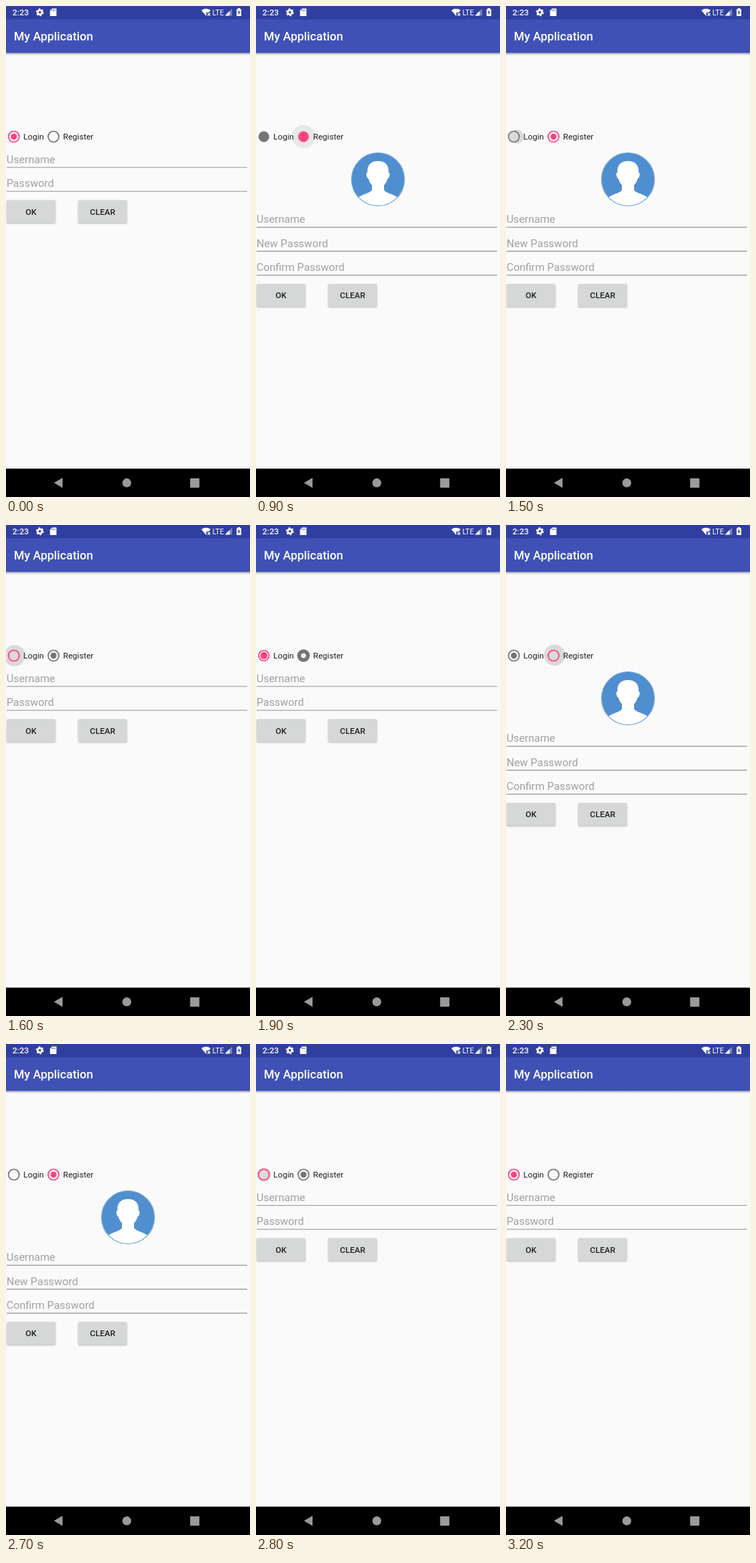
Animation, 341 px wide and 684 px high, one loop 3400 ms. Source, as an HTML page:

```html
<!DOCTYPE html>
<html lang="en">
<head>
<meta charset="utf-8">
<title>My Application</title>
<style>
  html, body { margin: 0; width: 100%; height: 100%; overflow: hidden; background: #fafafa; }
  svg { display: block; width: 341px; height: 684px; font-family: Roboto, sans-serif; }
  .bold { font-weight: 500; }
  .label { font-size: 11.6px; fill: #212121; }
  .hint { font-size: 15px; fill: #a0a0a0; }
  .btn { fill: #d6d7d7; filter: drop-shadow(0 1px .8px rgba(0, 0, 0, .28)); }
  .caption { font-size: 11.6px; font-weight: 500; fill: #202020; text-anchor: middle; }
</style>
</head>
<body>
<svg viewBox="0 0 341 684">
  <defs>
    <linearGradient id="shade" x2="0" y2="1">
      <stop stop-color="#000" stop-opacity=".3"/>
      <stop offset="1" stop-color="#000" stop-opacity="0"/>
    </linearGradient>
    <clipPath id="face"><circle cx="170.5" cy="241.5" r="37"/></clipPath>
    <g id="buttons">
      <rect class="btn" x="1" y="270.5" width="68" height="31.5" rx="1.5"/>
      <rect class="btn" x="101" y="270.5" width="68" height="31.5" rx="1.5"/>
      <text class="caption" x="35" y="290.6">OK</text>
      <text class="caption" x="135" y="290.6">CLEAR</text>
    </g>
  </defs>
  <rect width="341" height="684" fill="#fafafa"/>

  <!-- status and title bars -->
  <rect y="65.5" width="341" height="3.5" fill="url(#shade)"/>
  <rect y="18" width="341" height="47.5" fill="#3f51b5"/>
  <rect width="341" height="18.5" fill="#303f9f"/>
  <g fill="#fff">
    <text class="bold" x="9" y="13" font-size="11.6">2:23</text>
    <circle cx="47.3" cy="8.8" r="3" fill="none" stroke="#fff" stroke-width="2.6"/>
    <circle cx="47.3" cy="8.8" r="4.7" fill="none" stroke="#fff" stroke-width="1.6" stroke-dasharray="2.4 2.52"/>
    <path d="M64.5 3.5H70.5V14H61.5V6.5Z"/>
    <path d="M64.3 5v2.2M66.3 5v2.2M68.3 5v2.2" stroke="#303f9f" stroke-width=".8"/>
    <path d="M273 6Q279.5 1.5 286 6L283.5 9H280V13.2L279.5 13.8Z"/>
    <path d="M281.7 10l3.6 3.6m0-3.6l-3.6 3.6" stroke="#fff" stroke-width="1.2"/>
    <text x="288.5" y="12.5" font-size="10.2">LTE</text>
    <path d="M316 3.5V13.5H306Z" opacity=".35"/>
    <path d="M312.5 7V13.5H306Z"/>
    <path d="M324 3h3v1.2h1.7V14h-6.4V4.2H324Z"/>
    <path d="M326 5.5L323.7 9.6H325.2V12.6L327.4 8.5H326Z" fill="#303f9f"/>
    <text class="bold" x="11" y="48.3" font-size="16.6">My Application</text>
  </g>

  <!-- radio group -->
  <circle id="ripple"/>
  <g id="radios"></g>
  <text class="label" x="24.3" y="186.4">Login</text>
  <text class="label" x="79.8" y="186.4">Register</text>

  <g id="login">
    <g class="fields"></g>
    <use href="#buttons"/>
  </g>
  <g id="register">
    <circle cx="170.5" cy="241.5" r="37" fill="#508fcf"/>
    <path clip-path="url(#face)" fill="#fff" d="M170.5 216C180 216 186 221 185.3 232Q187.6 232.5 186.6 236Q185.8 240 184 240.5Q182.5 246 179 249.5V256C181 261 192 261.5 198.5 267L205 282H136L142.5 267C149 261.5 160 261 162 256V249.5Q158.5 246 157 240.5Q155.2 240 154.4 236Q153.4 232.5 155.7 232C155 221 161 216 170.5 216Z"/>
    <circle cx="170.5" cy="241.5" r="37" fill="none" stroke="#75a7da" stroke-width="1.2"/>
    <g class="fields"></g>
    <use href="#buttons" y="116.7"/>
  </g>

  <!-- navigation bar -->
  <rect y="644.5" width="341" height="39.5" fill="#000"/>
  <g fill="#9a9a9a">
    <path d="M67 664.3L79 657.3V671.3Z"/>
    <circle cx="168.8" cy="664.3" r="6.2"/>
    <rect x="257.3" y="658" width="13" height="13" rx=".8"/>
  </g>
</svg>
<script>
const LOOP = 3400, STEP = 100, FILL = 160, SETTLE = 400;
const PINK = '#ff4081', GREY = '#757575';
const CY = 182, CX = [11, 66.4];

// at: views swap; lead: progress already made by the radios at that moment
const switches = [
  { at: 900, lead: FILL, pick: 1 },
  { at: 1600, lead: 0, pick: 0 },
  { at: 2300, lead: 0, pick: 1 },
  { at: 2800, lead: 0, pick: 0 }
];
const taps = [
  { from: 700, show: 900, pick: 1, x: 66.4, y: 182 },
  { from: 1500, show: 1500, pick: 0, x: 15, y: 182 },
  { from: 2200, show: 2200, pick: 1, x: 72, y: 179 },
  { from: 2800, show: 2800, pick: 0, x: 11, y: 182 }
];

const $ = id => document.getElementById(id);
const mix = (a, b, k) => a + (b - a) * k;
const ease = k => k * k * (3 - 2 * k);

function add(parent, tag, attrs, text) {
  const el = document.createElementNS('http://www.w3.org/2000/svg', tag);
  set(el, attrs);
  if (text) el.textContent = text;
  return parent.appendChild(el);
}
function set(el, attrs) {
  for (const name in attrs) el.setAttribute(name, attrs[name]);
}

function addFields(view, top, hints, line) {
  const box = view.querySelector('.fields');
  hints.forEach((hint, i) => {
    const y = top + i * 33.4;
    add(box, 'text', { class: 'hint', x: 0.7, y }, hint);
    add(box, 'rect', { x: 1, y: y + 6 - line.h / 2, width: 336, height: line.h, fill: line.fill });
  });
}
addFields($('login'), 218.8, ['Username', 'Password'], { h: 1.6, fill: '#bababa' });
addFields($('register'), 302.2, ['Username', 'New Password', 'Confirm Password'], { h: 1, fill: '#808080' });

const radios = CX.map(cx => ({
  ring: add($('radios'), 'circle', { cx, cy: CY, fill: 'none' }),
  dot: add($('radios'), 'circle', { cx, cy: CY })
}));

function drawRadio({ ring, dot }, on, p) {
  const late = p >= FILL;
  const k = ease(late ? Math.min(1, (p - FILL) / (SETTLE - FILL)) : p / FILL);
  let scale, width = 1.7, r = 0;
  if (on === late) {
    // ring around a dot
    const swell = late ? 1 - k : k;
    scale = mix(1, 0.9, swell);
    r = mix(4.2, 6.2, swell);
  } else {
    // hollow ring that closes to a disc
    const close = late ? 1 - k : k;
    scale = mix(1, 0.5, close);
    width = mix(1.7, 15, close);
  }
  const color = on ? PINK : GREY;
  set(ring, { r: 7.5 * scale, 'stroke-width': width * scale, stroke: color });
  set(dot, { r, fill: color });
}

function drawRipple(t) {
  const tap = taps.findLast(a => t >= a.show);
  const p = tap ? t - tap.from : SETTLE;
  const k = Math.min(1, p / 200), out = 1 - (1 - k) ** 2;
  const alpha = p <= 100 ? 0.125 : Math.max(0, 0.07 * (SETTLE - p) / 200);
  set($('ripple'), {
    cx: tap ? mix(tap.x, CX[tap.pick], out) : 0,
    cy: tap ? mix(tap.y, CY, out) : 0,
    r: mix(10, 16.3, out),
    opacity: alpha
  });
}

function draw(now) {
  const t = Math.floor(now % LOOP / STEP) * STEP;
  const last = switches.findLast(s => t >= s.at);
  const pick = last ? last.pick : 0;
  const p = last ? t - last.at + last.lead : SETTLE;
  radios.forEach((radio, i) => drawRadio(radio, i === pick, p));
  drawRipple(t);
  $('login').style.display = pick ? 'none' : '';
  $('register').style.display = pick ? '' : 'none';
}

const start = performance.now();
function tick() {
  draw(performance.now() - start);
  requestAnimationFrame(tick);
}
tick();
</script>
</body>
</html>
```
